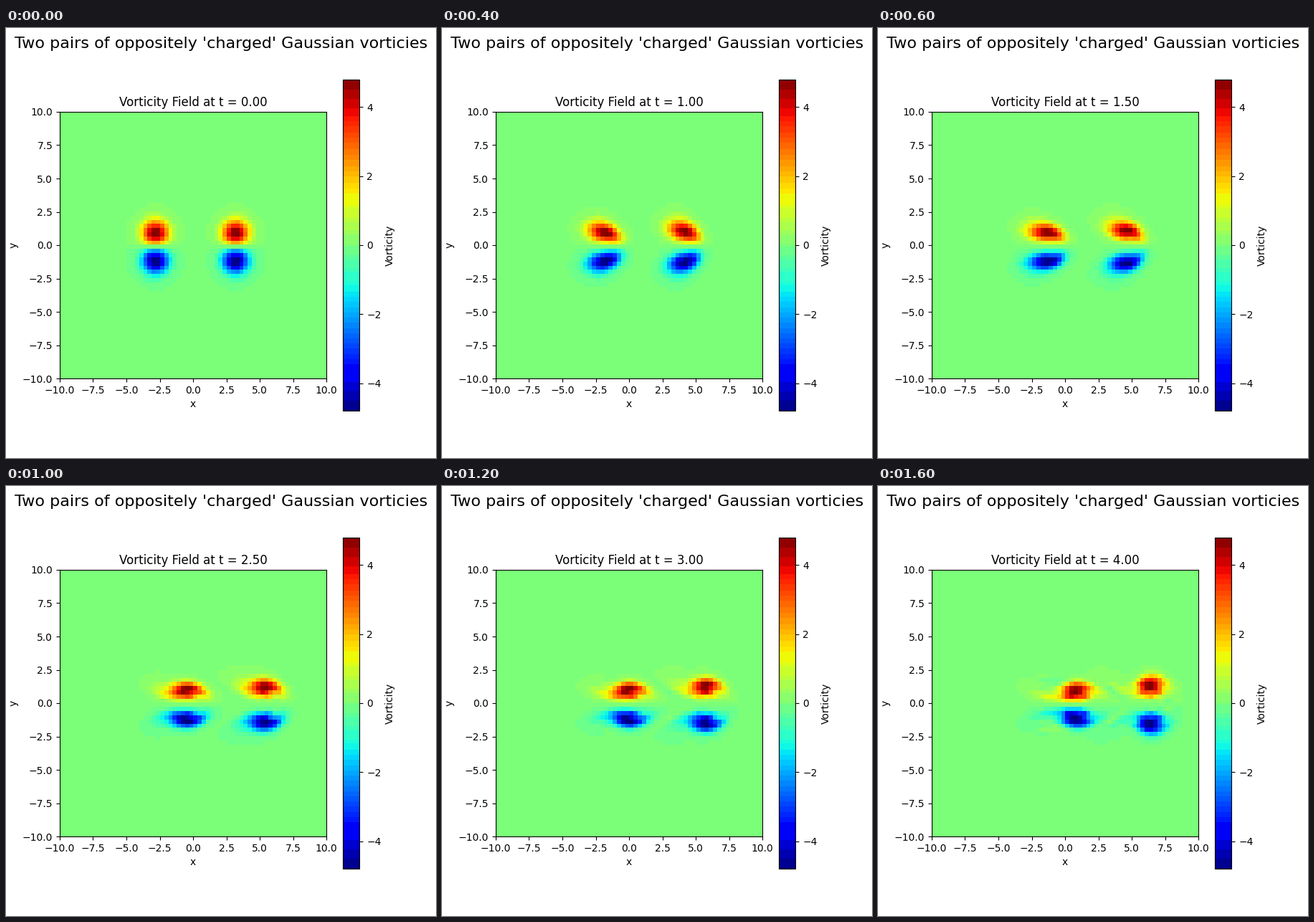
A matplotlib script that plays this animation: 600x600 px, repeating every 1.8 s.

```python
import matplotlib.pyplot as plt
import numpy as np
from matplotlib.animation import FuncAnimation
from matplotlib.colors import ListedColormap

N, SIZE = 64, 20.0
STEP = SIZE / N
NU = 0.001
FRAMES, INTERVAL = 9, 200
FRAME_TIME, SUBSTEPS = 0.5, 50

axis = np.arange(N) * STEP - SIZE / 2
X, Y = np.meshgrid(axis, axis)

wave = 2 * np.pi * np.fft.fftfreq(N, STEP)
KX, KY = np.meshgrid(wave, wave)
K2 = KX**2 + KY**2
K2[0, 0] = 1.0


def vortex(x0, y0, strength):
    return strength * np.exp(-(X - x0) ** 2 - (Y - y0) ** 2)


def ddx(f):
    return (np.roll(f, -1, 1) - np.roll(f, 1, 1)) / (2 * STEP)


def ddy(f):
    return (np.roll(f, -1, 0) - np.roll(f, 1, 0)) / (2 * STEP)


def laplacian(f):
    around = sum(np.roll(f, s, a) for s in (-1, 1) for a in (0, 1))
    return (around - 4 * f) / STEP**2


def rate(w):
    """Vorticity equation, with rows counted downwards."""
    w_hat = np.fft.fft2(w)
    w_hat[0, 0] = 0
    psi = np.real(np.fft.ifft2(-w_hat / K2))
    return NU * laplacian(w) + ddx(psi) * ddy(w) - ddy(psi) * ddx(w)


def advance(w):
    dt = FRAME_TIME / SUBSTEPS
    for _ in range(SUBSTEPS):
        k1 = rate(w)
        k2 = rate(w + dt / 2 * k1)
        k3 = rate(w + dt / 2 * k2)
        k4 = rate(w + dt * k3)
        w = w + dt / 6 * (k1 + 2 * k2 + 2 * k3 + k4)
    return w


def banded_jet():
    """Jet colours averaged within coarse RGB buckets."""
    colors = plt.get_cmap("jet")(np.arange(256), bytes=True)[:, :3].astype(int)
    buckets = colors // [32, 16, 32]
    weights = np.ones(256)
    weights[128] = 80  # the calm field dominates its band
    out = np.empty((256, 3))
    for i in range(256):
        same = (buckets == buckets[i]).all(axis=1)
        out[i] = np.average(colors[same], axis=0, weights=weights[same])
    return ListedColormap(out / 255)


fields = [sum(vortex(x, y, -5 * y) for x in (-3, 3) for y in (-1, 1))]
for _ in range(FRAMES - 1):
    fields.append(advance(fields[-1]))

fig, ax = plt.subplots(figsize=(6, 6), dpi=100)
fig.suptitle("Two pairs of oppositely 'charged' Gaussian vorticies", fontsize=16)
peak = np.abs(fields[0]).max()
image = ax.imshow(fields[0], extent=[-10, 10, -10, 10], cmap=banded_jet(),
                  vmin=-peak, vmax=peak, interpolation="nearest")
fig.colorbar(image, ax=ax, label="Vorticity")
ax.set_xlabel("x")
ax.set_ylabel("y")
title = ax.set_title("")


def update(i):
    image.set_data(fields[i])
    title.set_text(f"Vorticity Field at t = {i * FRAME_TIME:.2f}")
    return image, title


anim = FuncAnimation(fig, update, frames=FRAMES, interval=INTERVAL, repeat=True)
plt.show()
```
